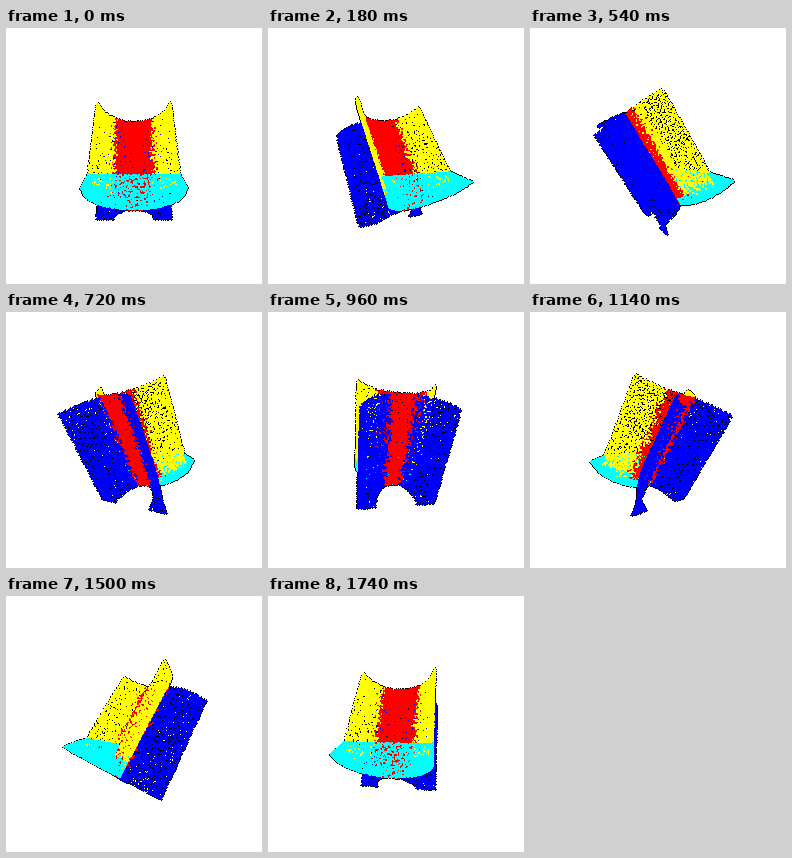
A matplotlib script for the animation above (1800 ms loop, 256 px wide and 256 px high).

```python
import numpy as np
import matplotlib.pyplot as plt
from matplotlib.animation import FuncAnimation

SIZE, FRAMES, INTERVAL = 256, 30, 60
CAM = 214.0                      # camera distance, in pixels at the spin axis
LENGTH, HALF, DEPTH = 103.0, 38.0, 30.0
LIP = 83.0                       # where the cyan lip starts along the channel
TOP = np.array([-38.8, -34.0])   # (down, toward viewer) start of the contact line
ALONG = np.array([0.845, 0.534])
NORMAL = np.array([-0.534, 0.845])

BLACK, BLUE, RED, YELLOW, CYAN = range(5)
PALETTE = np.array([(0, 0, 0), (0, 0, 255), (255, 0, 0),
                    (255, 255, 0), (0, 255, 255)], np.uint8)

rng = np.random.default_rng(7)


def grid(width, height, step):
    """Jittered points, a in [-1, 1] across and b in [0, 1] along."""
    a, b = np.meshgrid(np.linspace(-1, 1, int(width / step)),
                       np.linspace(0, 1, int(height / step)))
    a = a + rng.normal(0, 0.8 * step / width, a.shape)
    b = b + rng.normal(0, 0.4 * step / height, b.shape)
    keep = rng.random(a.shape) > 0.05
    return np.clip(a[keep], -1, 1), np.clip(b[keep], 0, 1)


def place(x, d, s):
    """Channel coordinates (across, height, along) to x, down, front."""
    yz = TOP + s[:, None] * ALONG + d[:, None] * NORMAL
    return np.column_stack([x, yz])


def arc(a):
    phi = a * np.radians(77)
    return 39 * np.sin(phi), 39 * (1 - np.cos(phi))


def upper_channel():
    a, b = grid(105, LENGTH, 1.6)
    x, d = arc(a)
    s = b * LENGTH
    red = np.abs(x) + rng.normal(0, 2.2, x.size) < 21 - 2 * b
    lip = s + rng.normal(0, 4, s.size) > LIP + 7
    col = np.where(red, RED, np.where(lip, CYAN, YELLOW))
    rim = lip & (s > LENGTH - 9)
    return place(x, d, s), np.where(rim & (np.abs(x) > 8), CYAN, col)


def lower_channel():
    a, b = grid(105, LENGTH, 1.55)
    x, d = arc(a)
    # close to the foot the arch narrows and gets flat sides
    bend = np.clip(a / 0.65, -1, 1) * np.pi / 2
    side = np.sign(a) * np.clip((np.abs(a) - 0.65) / 0.35, 0, 1)
    w = b ** 9
    x = (1 - w) * x + w * (21 * np.sin(bend) + 17 * side)
    d = (1 - w) * d + w * DEPTH * (1 - np.cos(bend))
    red = np.abs(x) + rng.normal(0, 2.2, x.size) < 10.5 - 1.5 * b
    return place(x, -d, b * LENGTH), np.where(red, RED, BLUE)


def lip_arms():
    a, b = grid(34, LENGTH - LIP, 1.4)
    x = np.sign(a) * HALF
    d = DEPTH + 17 * np.abs(a) * b
    return place(x, d, LIP + b * (LENGTH - LIP)), np.full(a.size, CYAN)


def lip_cap():
    a, b = grid(135, 34, 1.5)
    x, d = arc(np.clip(a / 0.8, -1, 1))
    d = d + 17 * np.clip((np.abs(a) - 0.8) / 0.2, 0, 1)
    rim = place(x, d, np.full(a.size, LENGTH))
    chord = np.column_stack([x, np.full(a.size, 16.0), np.full(a.size, 36.0)])
    chance = rng.random(a.size)
    col = np.full(a.size, CYAN)
    col[(np.abs(x) < 12) & (chance < 0.08)] = RED
    col[(np.abs(x) > 21) & (np.abs(x) < 36) & (b > 0.12) & (b < 0.4)
        & (chance < 0.25)] = YELLOW
    return chord + b[:, None] * (rim - chord), col


parts = [upper_channel(), lower_channel(), lip_arms(), lip_cap()]
POINTS = np.vstack([p for p, _ in parts])
COLORS = np.concatenate([c for _, c in parts])

FILL = [(0, 0), (-1, 0), (0, -1), (-1, -1)]
EDGE = [(1, 0), (0, 1), (-2, 0), (0, -2)]


def render(frame):
    t = 2 * np.pi * frame / FRAMES
    x, y, z = POINTS.T
    depth = z * np.cos(t) - x * np.sin(t)
    k = CAM / (CAM - depth)
    px = np.rint(SIZE / 2 + k * (x * np.cos(t) + z * np.sin(t))).astype(int)
    py = np.rint(SIZE / 2 + k * y).astype(int)

    img = np.full((SIZE, SIZE, 3), 255, np.uint8)
    # dark edges lie under every fill, so they show only against the page
    for dx, dy in EDGE:
        img[py + dy, px + dx] = PALETTE[BLACK]
    rows = np.concatenate([py + dy for _, dy in FILL])
    cols = np.concatenate([px + dx for dx, _ in FILL])
    order = np.argsort(np.tile(depth, len(FILL)), kind="stable")
    tint = np.tile(COLORS, len(FILL))[order]
    img[rows[order], cols[order]] = PALETTE[tint]
    return img


fig = plt.figure(figsize=(2.56, 2.56), dpi=100, facecolor="white")
ax = fig.add_axes([0, 0, 1, 1])
ax.axis("off")
view = ax.imshow(render(0), interpolation="nearest", aspect="auto")


def update(frame):
    view.set_data(render(frame))
    return [view]


anim = FuncAnimation(fig, update, frames=FRAMES, interval=INTERVAL,
                     repeat=True, repeat_delay=0, blit=False)
plt.show()
```
